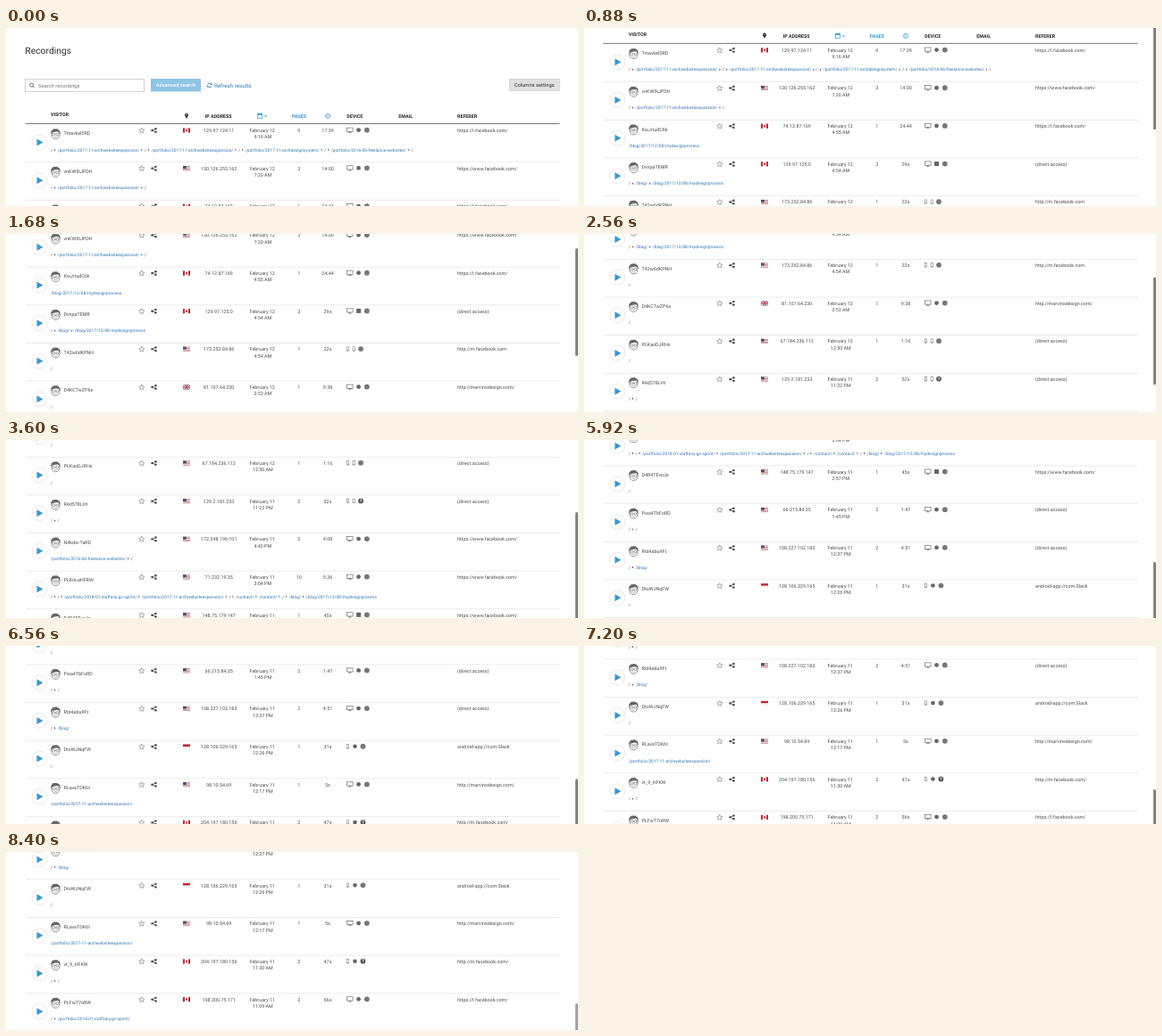
Recreate the animation shown at these times as an HTML page with a canvas. Size 640x200 px, loop 8.44 s.

```html
<!DOCTYPE html>
<html lang="en">
<head>
<meta charset="utf-8">
<title>Recordings</title>
<style>
html, body { margin: 0; width: 640px; height: 200px; overflow: hidden; background: #fff; }
canvas { display: block; width: 640px; height: 200px; }
</style>
</head>
<body>
<canvas id="stage"></canvas>
<script>
const canvas = document.getElementById('stage');
const ctx = canvas.getContext('2d');
const dpr = window.devicePixelRatio || 1;
canvas.width = 640 * dpr;
canvas.height = 200 * dpr;

const LOOP = 8440, STEP = 40, PITCH = 128 / 3, BODY = 5.36;
const TEXT = '#4a4a4a', DARK = '#222', LINK = '#2f74b0', BLUE = '#3a96d2', ICON = '#666';

const PAGES = {
  r: '/', b: '/blog/', c: '/contact/',
  m: '/blog/2017/12/08/mydesignprocess',
  a: '/portfolio/2017-11-archwebsiteexpansion/',
  d: '/portfolio/2017-11-archdesignsystem/',
  f: '/portfolio/2016-06-freelance-websites/',
  s: '/portfolio/2018-01-staffany-gv-sprint/'
};
const REFS = {
  l: 'https://l.facebook.com/', w: 'https://www.facebook.com/',
  m: 'http://m.facebook.com/', n: 'http://m.facebook.com', d: '(direct access)',
  p: 'http://marvinsdesign.com/', s: 'android-app://com.Slack'
};
// name, flag, address, time, pages, duration, devices, referer, visited pages
const rows = `
Tmavkel0RD|ca|129.97.124.11|9:16 AM|9|17:39|mac|l|rarardrfr
vnKW5tJPDH|us|130.126.255.162|7:20 AM|3|14:00|mac|w|rar
KwJrtudC6k|ca|74.12.87.169|4:55 AM|1|24:44|mao|l|m
DvnpaTEMR|ca|129.97.125.0|4:54 AM|3|29s|mwc|d|rbm
T42w6dKPNH|us|173.252.84.86|4:54 AM|1|22s|pps|n|r
D4KCTwZP6s|gb|81.107.64.230|3:53 AM|1|9:38|mac|p|r
PLKaoDJRHs|us|67.184.236.112|12:50 AM|1|1:16|pps|d|r
R4d578LHt|us|129.2.181.233|11:22 PM|2|52s|ppq|d|rr
N4kdw-TaRD|us|172.248.196.101|4:40 PM|2|4:08|mac|w|fr
PLKnLaHFRW|us|71.232.19.35|3:04 PM|10|5:36|mac|w|rrsarccrbm
D4R4TEvoJs|us|148.75.179.147|2:57 PM|1|45s|mwc|w|r
Pwa4TbFoRD|us|66.215.84.35|1:45 PM|2|1:47|mac|d|rr
Rtd4abu9Ft|us|108.227.102.183|12:37 PM|2|4:51|mac|d|rb
DtoWJNqFW|sg|128.106.229.165|12:26 PM|1|31s|pnc|s|r
RLavaTDK6t|us|98.10.54.69|12:17 PM|1|5s|mac|p|a
vt_9_HFKW|ca|204.197.180.156|11:30 AM|2|47s|pnq|m|rr
PLFwT7oRW|ca|198.200.75.171|11:09 AM|2|56s|mac|l|rs`.trim().split('\n').map(s => s.split('|'));

// swipes: start ms, end ms, end offset, sharpness
const swipes = [
  [400, 1200, 126.4, 1.6],
  [1360, 2600, 252.8, 1.232],
  [2880, 3960, 379.2, 1.37],
  [4240, 5560, 503.9, 1.83],
  [5880, 7840, 632, 1.609]
];
function scrollAt(t) {
  let pos = 0;
  for (const [t0, t1, to, n] of swipes) {
    if (t <= t0) break;
    const u = Math.min(1, (t - t0) / (t1 - t0));
    pos += (to - pos) * (1 - Math.pow(1 - Math.pow(u, 1.2), n));
  }
  return pos;
}

// scroll offset -> top of the scrollbar thumb
const thumbKeys = [[0, -38], [156, 16], [345, 81], [458, 120], [506, 137], [605.5, 161], [632, 170]];
function thumbTop(s) {
  let i = 1;
  while (i < thumbKeys.length - 1 && s > thumbKeys[i][0]) i++;
  const [a, y0] = thumbKeys[i - 1], [b, y1] = thumbKeys[i];
  return y0 + (y1 - y0) * (s - a) / (b - a);
}

function text(str, x, y, color = TEXT, size = BODY, align = 'left', weight = 400) {
  ctx.font = `${weight} ${size}px Roboto, Arial, sans-serif`;
  ctx.textAlign = align;
  ctx.fillStyle = color;
  ctx.fillText(str, x, y + size * 0.355);
}
const centered = (str, x, y) => text(str, x, y, TEXT, BODY, 'center');
function rect(x, y, w, h, color) {
  ctx.fillStyle = color;
  ctx.fillRect(x, y, w, h);
}
function box(x, y, w, h, color, lw = 0.7) {
  ctx.strokeStyle = color;
  ctx.lineWidth = lw;
  ctx.strokeRect(x, y, w, h);
}
function disc(x, y, r, color) {
  ctx.fillStyle = color;
  ctx.beginPath();
  ctx.arc(x, y, r, 0, 7);
  ctx.fill();
}
function ring(x, y, r, color, lw = 0.7, a = 0, b = Math.PI * 2) {
  ctx.strokeStyle = color;
  ctx.lineWidth = lw;
  ctx.beginPath();
  ctx.arc(x, y, r, a, b);
  ctx.stroke();
}
function poly(pts, color) {
  ctx.fillStyle = color;
  ctx.beginPath();
  pts.forEach(p => ctx.lineTo(p[0], p[1]));
  ctx.fill();
}
function line(pts, color, lw = 0.7) {
  ctx.strokeStyle = color;
  ctx.lineWidth = lw;
  ctx.beginPath();
  pts.forEach(p => ctx.lineTo(p[0], p[1]));
  ctx.stroke();
}

function flag(kind, x, y) {
  const red = '#c42636', navy = '#45507c';
  if (kind === 'ca') {
    rect(x, y, 8, 5.2, '#f6eeee');
    rect(x, y, 2, 5.2, red);
    rect(x + 6, y, 2, 5.2, red);
    poly([[x + 4, y + 0.9], [x + 5.3, y + 2.6], [x + 4, y + 4.3], [x + 2.7, y + 2.6]], red);
  } else if (kind === 'us') {
    rect(x, y, 8, 5.2, '#efe4e6');
    for (let i = 0; i < 4; i++) rect(x, y + i * 1.5, 8, 0.7, '#cb7780');
    rect(x, y, 3.8, 2.9, navy);
  } else if (kind === 'gb') {
    rect(x, y, 8, 5.2, navy);
    line([[x, y], [x + 8, y + 5.2]], '#eee', 1);
    line([[x + 8, y], [x, y + 5.2]], '#eee', 1);
    rect(x + 3, y, 2, 5.2, '#fff');
    rect(x, y + 1.6, 8, 2, '#fff');
    rect(x + 3.4, y, 1.2, 5.2, red);
    rect(x, y + 2, 8, 1.2, red);
  } else {
    rect(x, y, 8, 2.6, red);
    rect(x, y + 2.6, 8, 2.6, '#f4f1f1');
  }
}

// brand marks are plain shapes
const devices = {
  m(x, y) {
    box(x - 3.3, y - 2.6, 6.6, 4.2, ICON, 0.65);
    rect(x - 0.6, y + 1.6, 1.2, 1, ICON);
    rect(x - 1.8, y + 2.4, 3.6, 0.6, ICON);
  },
  p(x, y) {
    box(x - 1.2, y - 2.3, 2.4, 4.6, ICON, 0.5);
    rect(x - 1.2, y + 1.4, 2.4, 0.4, ICON);
  },
  a(x, y) { disc(x, y, 2.4, ICON); },
  w(x, y) { rect(x - 2.5, y - 2.5, 5, 5, ICON); },
  n(x, y) { disc(x, y, 2.3, ICON); },
  c(x, y) { disc(x, y, 2.9, '#777'); },
  o(x, y) { disc(x, y, 2.9, '#777'); },
  s(x, y) { disc(x, y, 2.9, '#777'); },
  q(x, y) {
    disc(x, y, 2.9, '#555');
    text('?', x, y, '#fff', 5, 'center', 700);
  }
};
function deviceIcons(kinds, y) {
  const xs = kinds[0] === 'm' ? [384.8, 394.5, 403.8]
    : kinds[1] === 'p' ? [382.5, 389.2, 397] : [382.5, 390.4, 399.4];
  xs.forEach((x, i) => devices[kinds[i]](x, y));
}

function avatar(x, y) {
  ctx.fillStyle = '#fff';
  ctx.strokeStyle = ICON;
  ctx.lineWidth = 0.7;
  ctx.beginPath();
  ctx.ellipse(x, y + 0.5, 4.6, 5.2, 0, 0, 7);
  ctx.fill();
  ctx.stroke();
  poly([[x - 5.3, y + 0.4], [x - 5, y - 3.2], [x - 2.6, y - 5.6], [x + 1.6, y - 5.8],
    [x + 4.8, y - 3.6], [x + 5.3, y + 0.4], [x + 4.2, y - 1], [x + 3, y - 2.6],
    [x - 1, y - 2.2], [x - 3.8, y - 1.4]], ICON);
  ring(x - 2, y + 0.6, 1.4, ICON, 0.6);
  ring(x + 2, y + 0.6, 1.4, ICON, 0.6);
  line([[x - 0.6, y + 0.5], [x + 0.6, y + 0.5]], ICON, 0.5);
  ring(x, y + 2.2, 1.6, ICON, 0.5, 0.5, 2.6);
}
function star(x, y) {
  ctx.strokeStyle = '#777';
  ctx.lineWidth = 0.6;
  ctx.beginPath();
  for (let i = 0; i < 10; i++) {
    const r = i % 2 ? 1.5 : 3.3, a = i * Math.PI / 5 - Math.PI / 2;
    ctx.lineTo(x + r * Math.cos(a), y + 0.2 + r * Math.sin(a));
  }
  ctx.closePath();
  ctx.stroke();
}
function share(x, y) {
  line([[x + 2, y - 1.8], [x - 2, y], [x + 2, y + 1.8]], '#444', 0.7);
  disc(x - 2, y, 1.2, '#444');
  disc(x + 2, y - 1.8, 1.2, '#444');
  disc(x + 2, y + 1.8, 1.2, '#444');
}
function play(x, y) {
  disc(x, y, 8.4, '#fff');
  ring(x, y, 8.4, '#e4e4e4', 0.8);
  poly([[x - 3, y - 4], [x + 4, y], [x - 3, y + 4]], BLUE);
}
function trail(keys, y) {
  let x = 50;
  [...keys].forEach((k, i) => {
    if (i) {
      poly([[x + 2, y - 1.2], [x + 3.6, y], [x + 2, y + 1.2]], '#555');
      x += 5.65;
    }
    text(PAGES[k], x, y, k === 'r' ? '#555' : LINK, 4.85);
    x += ctx.measureText(PAGES[k]).width;
  });
}

function drawRow(row, i, y) {
  const [name, country, ip, time, pages, length, kinds, ref, keys] = row;
  if (i) rect(22, y - 7.2, 598, 0.7, '#e4e4e4');
  play(37.5, y + 13.5);
  avatar(55.5, y + 4);
  text(name, 64.5, y + 3.5);
  star(151.8, y);
  share(165.5, y);
  flag(country, 198, y - 2.6);
  centered(ip, 238.2, y);
  centered('February ' + (i < 7 ? 12 : 11), 286.7, y);
  centered(time, 287.3, y + 7.3);
  centered(pages, 327.7, y);
  centered(length, 360, y);
  deviceIcons(kinds, y - 0.3);
  text(REFS[ref], 505, y);
  trail(keys, y + 21.9);
}

function drawHead() {
  text('Recordings', 21.3, 25.4, '#333', 10.35);

  box(21.5, 57.5, 133, 14, '#cfcfcf', 0.9);
  ring(28.6, 64, 2, '#555', 0.8);
  line([[30, 65.4], [31.8, 67.2]], '#555', 0.9);
  text('Search recordings', 36, 64.6, '#777', 5.8);

  rect(162, 57, 56, 14.5, '#8fc4e5');
  text('Advanced search', 190, 64.4, '#fff', 5.8, 'center', 500);

  ring(227.7, 64.4, 2.3, LINK, 0.8, 3.4, 5.9);
  ring(227.7, 64.4, 2.3, LINK, 0.8, 0.25, 2.75);
  poly([[230.6, 61.7], [230.6, 64], [228.4, 64]], LINK);
  poly([[224.8, 67.1], [224.8, 64.8], [227, 64.8]], LINK);
  text('Refresh results', 233, 64.5, LINK, 6.2);

  rect(563, 57, 56.5, 13.6, '#e0e0e0');
  box(563.3, 57.3, 56, 13.2, '#cfcfcf', 0.6);
  text('Columns settings', 591.2, 63.8, '#333', 5.8, 'center');

  const head = (s, x, y = 99.3, color = DARK) => text(s, x, y, color, 5.33, 'left', 700);
  head('VISITOR', 50, 97);
  disc(202, 97.6, 1.9, DARK);
  poly([[200.2, 98.2], [203.8, 98.2], [202, 102]], DARK);
  disc(202, 97.5, 0.7, '#fff');
  head('IP ADDRESS', 222.8);
  box(281.6, 96.6, 5, 4.8, BLUE);
  rect(281.6, 96.4, 5, 1.5, BLUE);
  rect(282.5, 95.5, 0.8, 1.4, BLUE);
  rect(285, 95.5, 0.8, 1.4, BLUE);
  poly([[289, 98.6], [292.2, 98.6], [290.6, 100.3]], BLUE);
  head('PAGES', 319.7, 99.3, BLUE);
  ring(360, 99, 2.5, BLUE, 0.8);
  line([[360, 97.4], [360, 99.3], [358.8, 99.3]], BLUE, 0.6);
  head('DEVICE', 381.2);
  head('EMAIL', 439.3);
  head('REFERER', 505);
  rect(21.5, 107, 598, 1, '#777');
}

function draw(t) {
  const s = scrollAt(t);
  ctx.setTransform(dpr, 0, 0, dpr, 0, 0);
  ctx.textRendering = 'geometricPrecision';
  rect(0, 0, 640, 200, '#fff');
  ctx.save();
  ctx.translate(0, -s);
  if (s < 110) drawHead();
  rows.forEach((row, i) => {
    const y = 115 + i * PITCH;
    if (y - s > -40 && y - s < 212) drawRow(row, i, y);
  });
  ctx.restore();
  if (t >= 440) {
    ctx.globalAlpha = t < 8360 ? 1 : t < 8400 ? 0.9 : 0.75;
    ctx.fillStyle = '#838383';
    ctx.beginPath();
    ctx.roundRect(637, thumbTop(s), 3, 121, 1.5);
    ctx.fill();
    ctx.globalAlpha = 1;
  }
}

const start = performance.now();
function tick() {
  const t = (performance.now() - start) % LOOP;
  draw(Math.floor(t / STEP) * STEP);
  requestAnimationFrame(tick);
}
tick();
</script>
</body>
</html>
```
